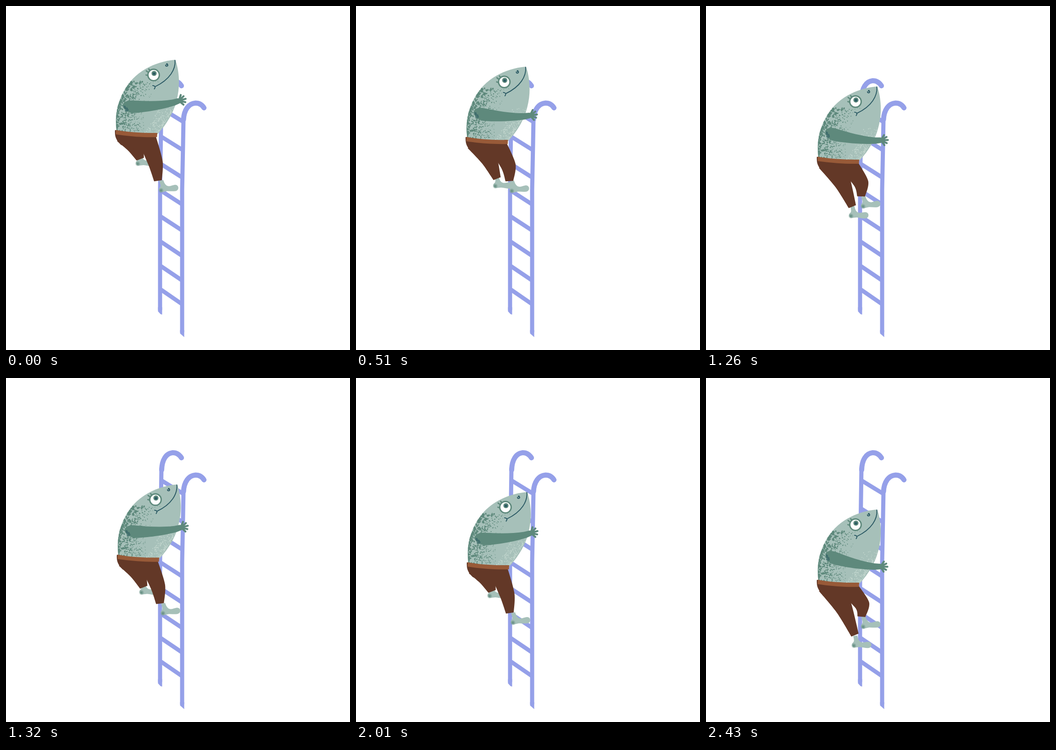
An HTML page that plays this animation: 748x748 px, repeating every 2.7 s.

```html
<!DOCTYPE html>
<html lang="en">
<head>
<meta charset="utf-8">
<title>Climbing down</title>
<style>
  html, body { margin: 0; width: 100%; height: 100%; overflow: hidden; background: #fff; }
  svg { display: block; width: 100%; height: 100%; }
  .line { fill: none; stroke-linecap: round; stroke-linejoin: round; }
</style>
</head>
<body>
<svg viewBox="0 0 748 748">
  <defs>
    <path id="torso" d="M371 160C327 164 282 186 259 230C244 258 240 288 245 318L333 322C350 304 368 278 375 248C383 218 381 187 373 162Z"/>
    <clipPath id="skin"><use href="#torso"/></clipPath>
    <radialGradient id="heel">
      <stop offset="0" stop-color="#5e897c"/>
      <stop offset="1" stop-color="#5e897c" stop-opacity="0"/>
    </radialGradient>
    <g id="foot">
      <path fill="#a6c0b9" d="M-2-20L7-21C9-11 12-7 18-6C23-6 26-7.500 31-7.500C40-7 40 6 30 6.300C24 6.300 18 4.500 12 4L2 5C-5 6-6-3-3-5C1-8 0-12-2-20Z"/>
      <circle cx="-.5" cy="1" r="6" fill="url(#heel)"/>
    </g>
  </defs>

  <g class="line" stroke="#95a0e9" stroke-width="9">
    <path stroke-width="11" d="M381.500 173.500C376 165 369 162 362 162.500C348 164 339 178 338.500 200"/>
    <path stroke-width="11" d="M430.500 221.500C426 214 420 211 412 211C397 212 387 226 386 247"/>
    <path d="M338 196L337 265L335 400V660M386 243L385 300L383 400V708"/>
    <path id="rungs" stroke-linecap="butt"/>
  </g>
  <path fill="#95a0e9" d="M330.500 655H339.500V671L336 670L330.500 664ZM378.500 705H387.500V720L378.500 712Z"/>

  <g id="fish">
    <use id="backFoot" href="#foot"/>
    <use id="frontFoot" href="#foot"/>
    <g fill="#633827">
      <path id="backLeg"/>
      <path id="frontLeg"/>
      <path d="M241 313C240 328 244 335 254 345L300 360L318 350L329 328V313Z"/>
    </g>
    <use href="#torso" fill="#a6c0b9"/>
    <g clip-path="url(#skin)">
      <path id="darkDots" fill="#5e897c"/>
      <path id="paleDots" fill="#c2d6ce"/>
    </g>
    <path fill="#985a38" d="M243 312.500C270 318 305 319.500 333 319L332.500 328C300 329 268 326 242.500 322Z"/>

    <circle cx="325" cy="193" r="12.400" fill="#fff" stroke="#5e897c" stroke-width="3"/>
    <circle cx="326" cy="189.500" r="5.600" fill="#5e897c"/>
    <circle cx="326" cy="190" r="2.800" fill="#285762"/>
    <path class="line" stroke="#5e897c" stroke-width="2.800" d="M312 194L308.500 193M313 187L309 184M317 183L314.500 180"/>
    <g class="line" stroke="#285762" stroke-width="1.900">
      <path d="M371.500 161C373 180 361 203 328 218.500M323 216C326 216 329 218 328 220.500C327.700 222 327 222.500 326.500 223"/>
      <path d="M351 171.500C351.500 175 356 174.500 356 171"/>
      <circle cx="354" cy="169.500" r="1"/>
    </g>

    <g id="arm">
      <path fill="#5e897c" d="M260 256C262 250 272 249 282 252C310 263 340 273 366 277L379 278C384 281 384 288 379 290L368 291C345 291 310 287 280 280C268 277 258 268 260 256Z"/>
      <path id="fingers" class="line" stroke="#5e897c" stroke-width="4.200"/>
      <path class="line" stroke="#285762" stroke-width="1.600" opacity=".75" d="M261.500 258L262.500 265M264 259L265.500 271M261.500 268L263 270M267 264L268 270"/>
    </g>
  </g>
</svg>
<script>
  const LOOP = 2700, STEP = 30;
  const $ = id => document.getElementById(id);
  const setPath = (id, d) => $(id).setAttribute("d", d);
  const clamp = x => Math.min(1, Math.max(0, x));
  const mix = (a, b, k) => a + (b - a) * k;
  const mixPoint = (a, b, k) => a.map((v, n) => mix(v, b[n], k));

  // Joints relative to the body, stretched and crouched
  const backLeg = {
    widths: [30, 18, 8.5], hip: [272, 323],
    knee: [[286, 350], [301, 377]], ankle: [[296, 376], [324, 433]], heel: [[291, 385], [322, 455]]
  };
  const frontLeg = {
    widths: [20, 16, 8.5], hip: [310, 330],
    knee: [[329, 384], [340, 368]], ankle: [[334.5, 423], [338, 393]], heel: [[341.5, 443], [342, 414]]
  };

  // Smooth curve through points, without the leading command
  function curve(pts) {
    const at = i => pts[Math.min(pts.length - 1, Math.max(0, i))];
    const handle = (i, side) => at(i).map((v, n) => v + side * (at(i + 1)[n] - at(i - 1)[n]) / 7);
    return pts.slice(1).reduce((d, p, i) => d + "C" + [handle(i, 1), handle(i + 1, -1), p], `${pts[0]}`);
  }

  // Tapered limb around hip, knee and ankle
  function limb(joints, widths) {
    const edge = side => joints.map(([x, y], i) => {
      const a = joints[Math.max(0, i - 1)], b = joints[Math.min(2, i + 1)];
      const dx = b[0] - a[0], dy = b[1] - a[1], k = side * widths[i] / Math.hypot(dx, dy);
      return [x + dy * k, y - dx * k];
    });
    return `M${curve(edge(1))}L${curve(edge(-1).reverse())}Z`;
  }

  let seed = 7;
  const rand = () => (seed = seed * 16807 % 2147483647) / 2147483647;

  function dots(count, place) {
    let d = "";
    for (let i = 0; i < count; i++) {
      const [x, y, r] = place();
      const ry = r * mix(.6, 1, rand()), turn = rand() * 180;
      d += `M${x - r} ${y}a${r} ${ry} ${turn} 1 0 ${2 * r} 0a${r} ${ry} ${turn} 1 0 ${-2 * r} 0`;
    }
    return d;
  }

  setPath("darkDots", dots(540, () => {
    const y = 207 + 111 * rand(), gap = 62 * rand() ** 1.9;
    const edge = 242 + 36 * (Math.max(0, 300 - y) / 95) ** 2;
    return [edge + gap, y, mix(.5, 1, rand()) * (2.2 - gap / 42)];
  }));
  setPath("paleDots", dots(280, () => {
    const y = 250 + 70 * rand() ** .8, gap = 32 * rand() ** 1.7;
    const edge = 376 - 42 * ((y - 250) / 70) ** 1.15;
    return [edge - gap, y, mix(.4, 1.1, rand())];
  }));

  let rungs = "", fingers = "";
  for (let i = 0; i < 8; i++) {
    const y = 224 + 62.5 * i - .87 * i * i, slope = .61 + .011 * i;
    rungs += `M337 ${y - 3 * slope}L384 ${y + 44 * slope}`;
  }
  for (let i = -2; i <= 2; i++) {
    const a = .03 + i * .5, reach = 15 - Math.abs(i);
    fingers += `M379 284L${379.5 + reach * Math.cos(a)} ${284 + reach * Math.sin(a)}`;
  }
  setPath("rungs", rungs);
  setPath("fingers", fingers);

  // crouch: 0 = leg stretched, 1 = knees bent
  function pose(t) {
    if (t < 1260) {
      const u = clamp((t - 210) / 390), drop = u ** 4;
      return { crouch: u ** 2.8, x: mix(-4, 0, drop), y: mix(-43, 0, drop) };
    }
    if (t < 2010) {
      const settle = speed => 1 - Math.exp(-((speed * (t - 1230) / 390) ** 2));
      return { crouch: 1 - settle(6.2), x: 0, y: 88 * settle(5.6) };
    }
    const u = clamp((t - 2010) / 420);
    return { crouch: u ** 2.8, x: 0, y: mix(88, 126, u ** 4) };
  }

  const place = (id, [x, y], turn) =>
    $(id).setAttribute("transform", `translate(${x} ${y}) rotate(${turn})`);

  function drawLeg(side, { widths, hip, knee, ankle, heel }, crouch, turn) {
    setPath(side + "Leg", limb([hip, mixPoint(...knee, crouch), mixPoint(...ankle, crouch)], widths));
    place(side + "Foot", mixPoint(...heel, crouch), turn);
  }

  function draw(time) {
    const { crouch, x, y } = pose(Math.floor(time % LOOP / STEP) * STEP);
    place("fish", [x, y], 0);
    drawLeg("back", backLeg, crouch, 0);
    drawLeg("front", frontLeg, crouch, -7);
    $("arm").setAttribute("transform", `rotate(${-17.8 * (1 - crouch)} 268 264)`);
  }

  const start = performance.now();
  function tick() {
    draw(performance.now() - start);
    requestAnimationFrame(tick);
  }
  tick();
</script>
</body>
</html>
```
